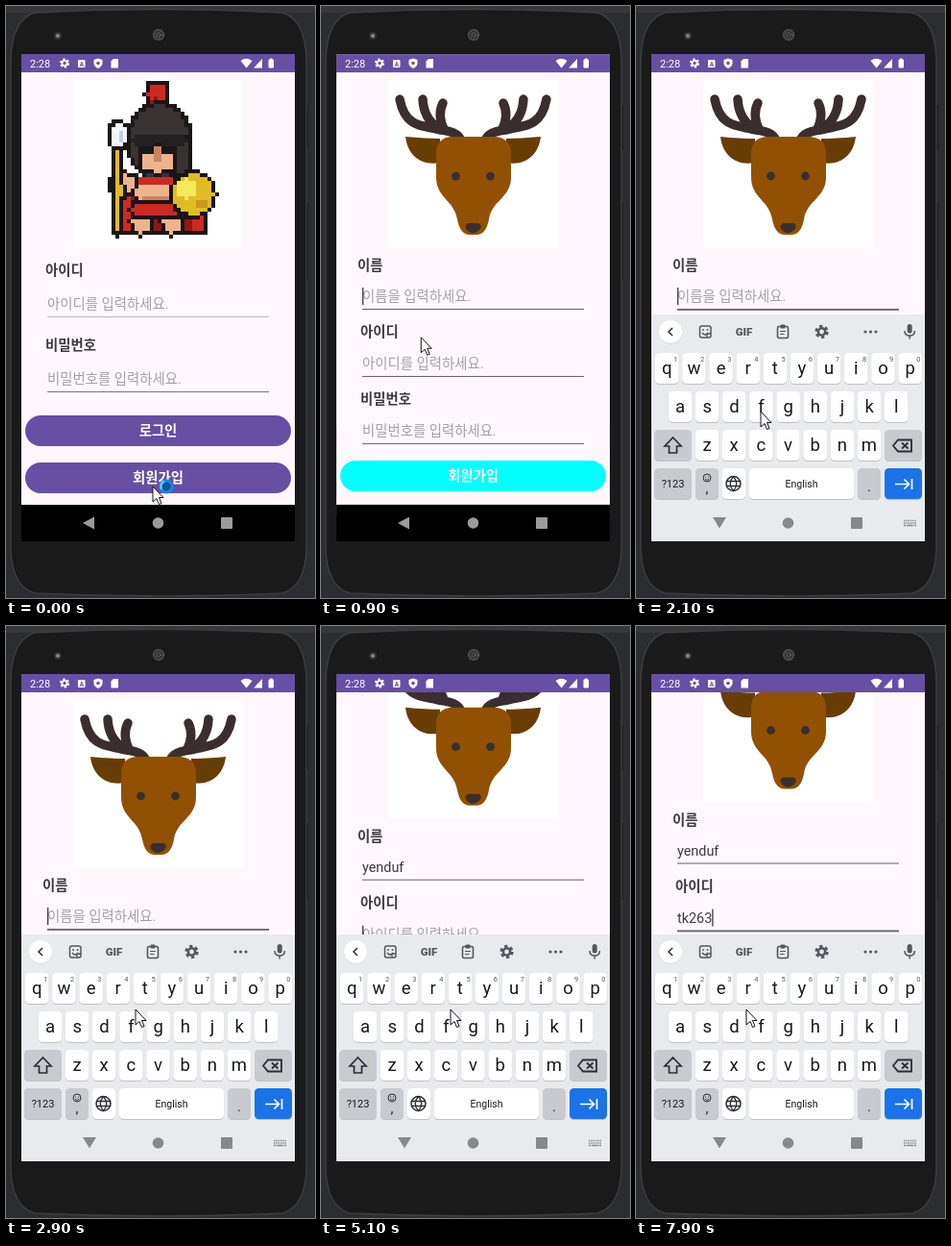
Recreate the animation shown at these times as an HTML page. Size 322 by 616 pixels, loop 8000 ms.

```html
<!DOCTYPE html>
<html lang="ko">
<head>
<meta charset="utf-8">
<title>회원가입</title>
<style>
  html, body { margin: 0; width: 100%; height: 100%; overflow: hidden; background: #2b2d30; }
  svg { display: block; width: 100%; height: 100%; }
  text { font-family: Roboto, "Noto Sans CJK KR", "Noto Sans CJK", sans-serif; white-space: pre; }
</style>
</head>
<body>
<svg id="stage" viewBox="0 0 322 616"></svg>
<script>
const LOOP = 8000, STEP = 100;
const PURPLE = '#674fa3', PAPER = '#fef8fd', INK = '#3c3a3e', HINT = '#a3a0a5', ICON = '#54585e', KEYBOARD = '#e8eaee';
const $ = id => document.getElementById(id);

// Markup helpers
const rect = (x, y, w, h, fill, rx = 0, more = '') =>
  `<rect x="${x}" y="${y}" width="${w}" height="${h}" fill="${fill}" rx="${rx}" ${more}/>`;
const circle = (x, y, r, fill, more = '') => `<circle cx="${x}" cy="${y}" r="${r}" fill="${fill}" ${more}/>`;
const shape = (d, fill) => `<path d="${d}" fill="${fill}"/>`;
const line = (d, color, width = 1, more = '') =>
  `<path d="${d}" fill="none" stroke="${color}" stroke-width="${width}" ${more}/>`;
const text = (x, y, s, size, fill, more = '') =>
  `<text x="${x}" y="${y}" font-size="${size}" fill="${fill}" ${more}>${s}</text>`;
const middle = 'text-anchor="middle"', bold = 'font-weight="700"';
const group = (id, body) => `<g id="${id}">${body}</g>`;
const gear = (x, y, r, color, hole) =>
  circle(x, y, r, 'none', `stroke="${color}" stroke-width="${r * .55}" stroke-dasharray="${r * .55} ${r * .497}"`) +
  circle(x, y, r * .65, hole, `stroke="${color}" stroke-width="${r * .45}"`);

function phone() {
  return rect(0, 0, 322, 7, '#35373b') + rect(312, 103, 3, 47, '#1d1d1e', 1) + rect(312, 205, 3, 80, '#1d1d1e', 1) +
    `<path d="M5 56Q6 14 30 7Q159 0 288 7Q312 14 313 56V565Q312 604 288 611Q159 617 30 611Q6 604 5 565Z" fill="#1a1a1a" stroke="#3c3d3f" stroke-width="1.5"/>` +
    circle(54, 31, 4, '#333') + circle(54, 31, 2, '#888') + circle(159, 30, 6.5, '#2d2d2d') +
    [5, 2].map(r => circle(159, 30, r, 'none', 'stroke="#636363" stroke-width="2" stroke-dasharray="1 1"')).join('') +
    rect(16, 50, 285, 507, '#000');
}

// Samples rounded shapes on a coarse grid; each one gets a dark rim unless told otherwise.
function warrior() {
  const cell = 4, pixels = {};
  function paint(fill, cx, cy, rx, ry, power, rim) {
    for (let x = 102; x < 224; x += cell) for (let y = 78; y < 242; y += cell) {
      const inside = (a, b) => Math.abs((x + 2 - cx) / a) ** power + Math.abs((y + 2 - cy) / b) ** power <= 1;
      if (inside(rx, ry)) pixels[[x, y]] = fill;
      else if (rim && inside(rx + cell, ry + cell)) pixels[[x, y]] = '#1a1516';
    }
  }
  const round = (fill, cx, cy, rx, ry, rim = true) => paint(fill, cx, cy, rx, ry, 2, rim);
  const box = (fill, cx, cy, rx, ry, rim = true) => paint(fill, cx, cy, rx, ry, 20, rim);
  const red = '#cb2a22', darkRed = '#8f1814', skin = '#ecb48c', tan = '#c98560', hair = '#393334', gold = '#e0bc24';

  box(darkRed, 160, 215, 46, 20);
  box(red, 126, 215, 5, 20, false);
  box(red, 200, 216, 6, 18, false);
  box(red, 157, 92, 9, 9);
  box(darkRed, 157, 99, 9, 3, false);
  round(hair, 160, 141, 31, 38);
  box(hair, 182, 156, 7, 19);
  box('#241f20', 160, 140, 28, 5, false);
  box(skin, 158, 160, 16, 12);
  box('#1a1516', 158, 151, 17, 4, false);
  box(tan, 158, 154, 3, 9, false);
  round(skin, 124, 186, 14, 10);
  box(skin, 141, 225, 9, 11);
  box(skin, 173, 225, 9, 11);
  box(skin, 157, 194, 21, 14);
  box(tan, 157, 199, 15, 2, false);
  box(red, 157, 182, 20, 4, false);
  box(red, 157, 212, 25, 7);
  box(gold, 117, 192, 3, 44);
  round('#f2f4fa', 117, 135, 9, 13);
  box('#c2cfe2', 121, 137, 3, 6, false);
  round(gold, 195, 196, 21, 21);
  round('#f6e75c', 188, 190, 10, 10, false);
  round('#c9971a', 203, 206, 6, 6, false);

  return rect(70, 77, 176, 175, '#fff') + '<g shape-rendering="crispEdges">' + Object.entries(pixels)
    .map(([at, fill]) => rect(...at.split(','), cell, cell, fill)).join('') + '</g>';
}

function deer() {
  const bark = '#3b2e2e';
  const half = line('M82 97C88 128 108 124 125 129Q145 131 146 142M106 97Q107 117 122 127M127 101Q121 113 128 128', bark, 9.5, 'stroke-linecap="round"') +
    shape('M124 138Q110 138 88 136C90 154 103 167 124 163Z', '#683d04');
  const face = 'M138 136H179Q198 136 198 154V178C198 200 178 202 175 222Q172 238 162 238H155Q145 238 142 222C139 202 120 200 120 178V154Q120 136 138 136Z';
  return rect(70, 77, 178, 175, '#fff') + half + `<g transform="matrix(-1 0 0 1 317 0)">${half}</g>` + shape(face, '#925003') +
    circle(140.5, 177, 4.4, bark) + circle(176.5, 177, 4.4, bark) +
    shape('M153 226H164Q169 228 165 233Q159 239 153 234Q148 229 153 226Z', bark);
}

const windowFrame = body =>
  rect(16, 50, 285, 469, PAPER) + body + rect(16, 50, 285, 19, PURPLE) + rect(16, 519, 285, 38, '#000');
const pill = (y, s, fill) => rect(20, y, 277, 32, fill, 16) + text(158.5, y + 21, s, 14.4, '#fff', `${middle} ${bold}`);
const field = (name, x, labelY, hintY, id = '', color = '#65626a') =>
  text(x, labelY, name, 14.4, INK, bold) +
  text(43, hintY, `${name}${name === '이름' ? '을' : '를'} 입력하세요.`, 14.4, HINT, `id="${id}Hint"`) +
  rect(43, hintY + 8, 231, 1, color, 0, `id="${id}Line"`) +
  text(43, hintY + .5, '', 14.4, INK, `id="${id}Text"`);

const login = () => windowFrame(warrior() +
  field('아이디', 41, 280, 315, 'loginId', '#bcb8be') + field('비밀번호', 41, 358, 393, 'loginPass', '#78757b') +
  pill(426, '로그인', PURPLE) + pill(475, '회원가입', PURPLE));

const signup = () => windowFrame(group('content', deer() +
  field('이름', 38, 275, 307, 'name') + field('아이디', 41, 344, 377, 'id') + field('비밀번호', 41, 414, 447, 'pass') +
  pill(473, '회원가입', '#00ffff') +
  rect(43, 311, 0, 1, INK, 0, 'id="composing"') + rect(43, 293, 1.3, 18, INK, 0, 'id="caret"')));

const statusIcons = () => text(25, 63.5, '2:28', 11, '#fff') +
  gear(61, 59.5, 4, '#fff', PURPLE) +
  rect(75, 56, 7.5, 8, '#fff', 1) + text(78.8, 62.5, 'A', 7, PURPLE, `${middle} ${bold}`) +
  shape('M96 54.5L100.5 56V60Q100 63 96 65Q92 63 91.5 60V56Z', '#fff') + circle(96, 59.5, 1.8, PURPLE) +
  shape('M112 55H117V64.5H109.5V57.5Z', '#fff') +
  shape('M244.5 57Q250.5 52.5 256.5 57L250.5 64.5Z', '#fff') + shape('M267 55V64.5H258Z', '#fff') +
  rect(273.5, 55.5, 5.5, 9, '#fff', 1) + rect(275, 54.5, 2.5, 2, '#fff');

const navIcons = (color, back) => shape(back, color) + circle(158.5, 538, 5.8, color) + rect(224, 532, 12, 12, color, 1);
const keyboardIcon = color => line('M279 535.5H292M279 538H292', color, 1.4, 'stroke-dasharray="1.4 .9"') +
  line('M279 540.5H292', color, 1.4, 'stroke-dasharray="2.3 .9 6.6 .9"');

function keyboard() {
  const grey = '#c8cad0', dark = '#2b2e32';
  const key = (x, y, w, fill = '#fff', s = '', size = 0) =>
    rect(x, y + 1, w, 32, '#bfc1c7', 4.5) + rect(x, y, w, 32, fill, 4.5) + text(x + w / 2, y + 16 + size * .34, s, size, '#18191b', middle);
  const row = (letters, x, y) => [...letters].map((c, i) => key(x + 28.15 * i, y, 24.5, '#fff', c, 18.5)).join('');
  const digits = [...'1234567890'].map((d, i) => text(41 + 28.15 * i, 370, d, 7.5, ICON, middle)).join('');
  const tools = rect(66.5, 333, 11.5, 12, 'none', 2, `stroke="${ICON}" stroke-width="1.5"`) +
    line('M69 340Q72 344 75 340M74 345V341H78', ICON, 1.3) + circle(70, 337, 1, ICON) + circle(74.5, 337, 1, ICON) +
    text(112.5, 343, 'GIF', 11.5, ICON, `${middle} font-weight="900"`) +
    rect(147.5, 333.5, 11, 12, 'none', 1.5, `stroke="${ICON}" stroke-width="1.6"`) + rect(150.5, 331.5, 5, 4, ICON, 1) +
    line('M150 338.5H156M150 341.5H154.5', ICON, 1.2) + gear(193.5, 339, 5.6, ICON, KEYBOARD) +
    [239, 244.5, 250].map(x => circle(x, 339, 1.6, ICON)).join('');
  const words = [0, 1, 2].map(i => text(81 + 76.3 * i, 345, '', 14.5, '#5b5f65', `id="word${i}" ${middle}`)).join('') +
    rect(117, 330, 1, 19, '#c3c6cb') + rect(198, 330, 1, 19, '#c3c6cb');
  return rect(16, 321, 285, 236, KEYBOARD) +
    circle(36, 339.5, 12, '#c9ccd1') + circle(36, 339, 12, '#fff') +
    line('M38 335L34 339L38 343', '#333', 1.6, 'id="chevron"') + group('tools', tools) + group('words', words) +
    rect(282.7, 331, 5, 9.5, ICON, 2.5) + line('M280 338Q280 343 285.2 343Q290.4 343 290.4 338M285.2 343V346.5', ICON, 1.5) +
    row('qwertyuiop', 20, 361) + digits + row('asdfghjkl', 33.8, 401) +
    key(19, 441, 39, grey) + row('zxcvbnm', 61.8, 441) + key(259, 441, 39, grey) +
    line('M38.5 449L47 458H42.5V465H34.5V458H30Z', dark, 1.7) +
    line('M268 457.5L273 451.5H287V463.5H273ZM277 454.5L283.5 460.5M283.5 454.5L277 460.5', dark, 1.8) +
    key(19, 481, 39, grey, '?123', 11) + key(62, 481, 24, grey) + circle(74, 491, 4, 'none', `stroke="${dark}"`) +
    line('M72 492Q74 495 76 492M72.5 489.5V490.5M75.5 489.5V490.5', dark) + text(74, 507, ',', 15, dark, middle) +
    key(90, 481, 24) + circle(101.5, 497, 7.5, 'none', `stroke="${dark}" stroke-width="1.5"`) +
    line('M94 494.5H109M94 499.5H109M101.5 489.5Q95 497 101.5 504.5Q108 497 101.5 489.5', dark, 1.3) +
    key(118, 481, 109, '#fff', 'English', 10.5) + key(231, 481, 24, grey) + text(243, 505, '.', 15, dark, middle) +
    key(259, 481, 39, '#1a73e8') + line('M270 497.5H284M279.5 492.5L284.5 497.5L279.5 502.5M287.5 492V503', '#fff', 1.7) +
    navIcons('#85888d', 'M80 532H94L87 543.5Z') + keyboardIcon('#85888d');
}

$('stage').innerHTML = `<clipPath id="screen"><rect x="16" y="50" width="285" height="507"/></clipPath>` + phone() +
  `<g clip-path="url(#screen)">` + group('loginWin', login()) +
  rect(16, 50, 285, 507, '#000', 0, 'id="dim"') + group('signupWin', signup()) +
  statusIcons() + navIcons('#9b9b9b', 'M92 531.5V544.5L80 538Z') + group('imeIcon', keyboardIcon('#9b9b9b')) +
  group('keyboard', keyboard()) + '</g>' +
  group('pointer', `<path d="M0 0V16L4 12.5L6.5 18.5L9 17.5L6.5 11.5H11Z" fill="#fff" stroke="#111"/>` +
    group('busy', circle(14, 0, 6, '#174f9e', 'stroke="#1687e0" stroke-width="3"') + line('M9 3A6 6 0 0 1 12 -5.5', '#45d3f3', 2.5)));

// Pointer stops: time, x, y
const stops = [[200, 153, 500], [600, 153, 491], [1000, 88, 296], [1600, 90, 299], [1900, 90, 299],
  [2100, 130, 422], [2400, 135, 399], [7700, 135, 399], [7900, 115, 399]];
const FOCUS_NAME = 1900, FOCUS_ID = 5000;

const clamp = v => Math.max(0, Math.min(1, v));
const between = (t, a, b) => t >= a && t < b;
const typed = (word, times, t) => word.slice(0, times.filter(at => at <= t).length);
const set = (id, attrs) => Object.entries(attrs).forEach(([k, v]) => $(id).setAttribute(k, v));
const show = (id, on) => set(id, { display: on ? 'inline' : 'none' });
const zoom = k => `translate(158.5 303.5) scale(${k}) translate(-158.5 -303.5)`;

function pointerAt(t) {
  let [, x, y] = stops[0];
  stops.slice(1).forEach(([end, nextX, nextY], i) => {
    const k = clamp((t - stops[i][0]) / (end - stops[i][0]));
    x += (nextX - x) * k;
    y += (nextY - y) * k;
  });
  return [x, y];
}

function render(t) {
  // Screen change
  const opened = 1 - (1 - clamp((t - 200) / 800)) ** 2.8;
  set('loginWin', { transform: zoom(1 + .05 * opened) });
  set('signupWin', { transform: zoom(.85 + .15 * opened), opacity: clamp((t - 200) / 200) });
  set('dim', { opacity: .08 * opened });

  // Form
  const onId = t >= FOCUS_ID, active = onId ? 'id' : 'name';
  const values = {
    name: typed('yenduf', [3300, 3400, 4100, 4200, 4300, 4300], t),
    id: typed('tk263', [6400, 6700, 7000, 7200, 7200], t)
  };
  for (const [id, value] of Object.entries(values)) {
    $(id + 'Text').textContent = value;
    show(id + 'Hint', !value);
    set(id + 'Line', { height: id === active && t >= FOCUS_NAME ? 1.8 : 1 });
  }
  set('content', { transform: `translate(0 ${-68.5 * clamp((t - FOCUS_ID + 50) / 200)})` });

  const value = values[active], drop = onId ? 70 : 0;
  const width = value ? $(active + 'Text').getComputedTextLength() : 0;
  const blinkOn = Math.floor((t - (onId ? FOCUS_ID : FOCUS_NAME)) / 500) % 2 === 0;
  const suggesting = between(t, 3400, FOCUS_ID) || between(t, 6500, 7500);
  set('caret', { x: 43 + width, y: 293 + drop });
  show('caret', value || blinkOn);
  set('composing', { width: suggesting ? width : 0, y: 311 + drop });

  // Keyboard
  show('imeIcon', t >= 1800);
  show('keyboard', t > FOCUS_NAME);
  set('keyboard', { transform: `translate(0 ${236 * (1 - clamp((t - FOCUS_NAME) / 200)) ** 2})` });
  show('tools', !suggesting);
  show('words', suggesting);
  set('chevron', { d: suggesting ? 'M34 335L38 339L34 343' : 'M38 335L34 339L38 343' });
  const words = t < 4200 ? ['ys', 'ya', 'yes'] : [value, 'the', 'yes'];
  words.forEach((word, i) => $('word' + i).textContent = word);

  set('pointer', { transform: `translate(${pointerAt(t)})` });
  show('busy', t < 200);
}

function tick() {
  render(Math.floor(performance.now() % LOOP / STEP) * STEP);
  requestAnimationFrame(tick);
}
tick();
</script>
</body>
</html>
```
